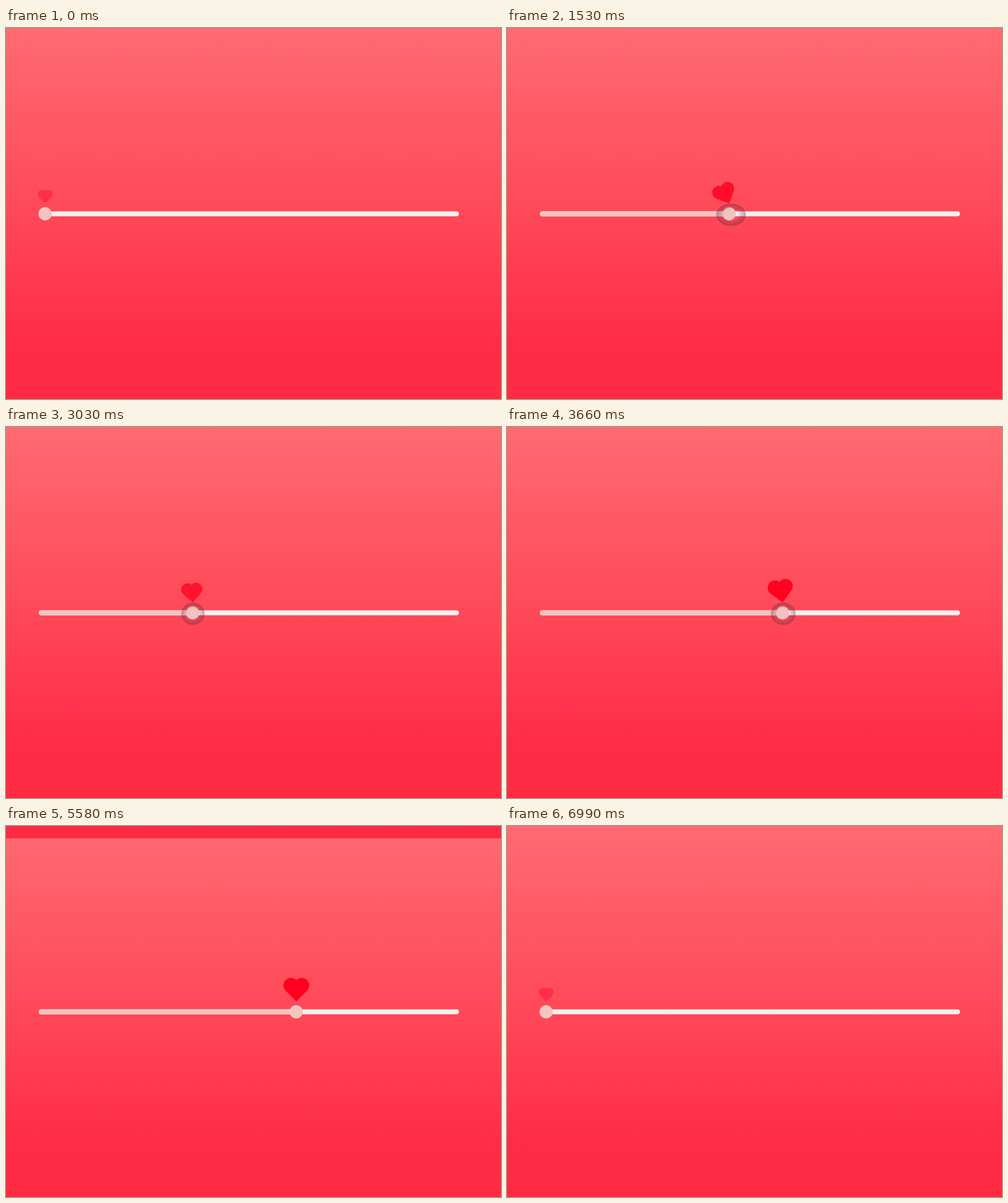
Animation, 800 px wide and 600 px high, one loop 7.95 s. Source, as an HTML page with a canvas:

```html
<!DOCTYPE html>
<html lang="en">
<head>
<meta charset="utf-8">
<title>Love slider</title>
<style>
html, body { margin: 0; width: 100%; height: 100%; overflow: hidden; background: #ff4858; }
canvas { display: block; }
</style>
</head>
<body>
<canvas id="stage" width="800" height="600"></canvas>
<script>
const ctx = document.getElementById('stage').getContext('2d');
const LOOP = 7950;
const LEFT = 53, RIGHT = 732, MID = 300.5, START = 63.25, TIP = 283.7;

// Drag legs: start time, end time, from x, to x, peak heart tilt in degrees
const legs = [
  [885, 1990, 64, 536, -26],
  [1990, 2860, 536, 297, 33.6],
  [2922, 3935, 297, 477, -12],
  [3935, 4060, 477, 469, 5]
];

const clamp = v => Math.min(1, Math.max(0, v));
const span = (t, a, b) => clamp((t - a) / (b - a));
const lerp = (a, b, p) => a + (b - a) * p;
const sine = p => (1 - Math.cos(Math.PI * p)) / 2;
const quad = p => p < 0.5 ? 2 * p * p : 1 - 2 * (1 - p) ** 2;

// Grows from 0 to 1, passing about 1.28 on the way
function pop(p) {
  const k = 3.6, q = p - 1;
  return 1 + (k + 1) * q ** 3 + k * q * q;
}

const sky = ctx.createLinearGradient(0, 0, 0, 600);
[[0, '#ff6b73'], [0.5, '#ff4858'], [0.85, '#ff2c47'], [1, '#ff2942']]
  .forEach(([at, color]) => sky.addColorStop(at, color));

const touch = ctx.createRadialGradient(0, 0, 0, 0, 0, 18);
[[0, 0], [0.5, 0.02], [0.65, 0.18], [0.82, 0.25], [0.92, 0.36], [1, 0.3]]
  .forEach(([at, a]) => touch.addColorStop(at, `rgba(70,40,55,${a})`));

function drag(t) {
  let x = 64, tilt = 0;
  for (const [a, b, from, to, peak] of legs) {
    if (t < a) break;
    const p = span(t, a, b);
    x = lerp(from, to, sine(p));
    tilt = peak * Math.sin(Math.PI * p);
  }
  return { x, tilt };
}

function disc(x, y, r, color) {
  ctx.fillStyle = color;
  ctx.beginPath();
  ctx.arc(x, y, Math.max(0, r), 0, Math.PI * 2);
  ctx.fill();
}

function bar(x1, color) {
  const w = x1 - LEFT;
  if (w <= 0) return;
  ctx.fillStyle = color;
  ctx.beginPath();
  ctx.roundRect(LEFT, MID - 4, w, 8, Math.min(4, w / 2));
  ctx.fill();
}

// A square on its corner with a half circle on each upper side; origin at the tip
function heart(x, y, scale, tilt, color) {
  if (scale <= 0) return;
  const s = 14.06, d = s * Math.SQRT1_2, q = Math.PI / 4;
  ctx.save();
  ctx.translate(x, y);
  ctx.rotate(tilt * Math.PI / 180);
  ctx.scale(scale, scale);
  ctx.fillStyle = color;
  ctx.beginPath();
  ctx.moveTo(0, 0);
  ctx.arc(-d / 2, -1.5 * d, s / 2, 3 * q, 7 * q);
  ctx.arc(d / 2, -1.5 * d, s / 2, 5 * q, 9 * q);
  ctx.closePath();
  ctx.fill();
  ctx.restore();
}

function background(y) {
  ctx.save();
  ctx.translate(0, y);
  ctx.fillStyle = sky;
  ctx.fillRect(0, 0, 800, 600);
  ctx.restore();
}

function echo(t, x, scale) {
  if (t < 4180 || t > 5130) return;
  const p = span(t, 4180, 4440);
  const grow = lerp(1, 2.15, 1 - (1 - p) ** 2);
  ctx.globalAlpha = lerp(0.5, 0.06, p) * (1 - span(t, 4920, 5130));
  heart(x, 264.4 + 19.3 * grow, scale * grow, 0, '#ff0020');
  ctx.globalAlpha = 1;
}

function finger(t, x, lag) {
  if (t < 130 || t > 4170) return;
  const p = sine(span(t, 130, 870));
  ctx.save();
  ctx.globalAlpha = 1 - span(t, 4060, 4170);
  ctx.translate(p < 1 ? lerp(-20, 64, p) : x, lerp(407, 302, p));
  ctx.scale(1 + Math.abs(lag) / 9, 1);
  disc(0, 0, 18, touch);
  ctx.restore();
}

function slider(x, tilt, trackEnd, knobSize, heartSize) {
  const away = x - START;
  const scale = 1 + 0.00182 * away;
  const hue = clamp(away / 405);
  const g = Math.round(lerp(45, 0, hue)), b = Math.round(lerp(72, 32, hue));
  bar(trackEnd, '#f5eff0');
  if (away > 0.5) bar(x, '#f1c5bf');
  disc(x, MID, 10.75 * knobSize, '#f1c6c1');
  heart(x + 0.2, TIP, scale * heartSize, tilt, `rgb(255,${g},${b})`);
  return scale;
}

function draw(t) {
  background(0);
  if (t < 5790) {
    const { x, tilt } = drag(t);
    const lag = -tilt * 0.12;
    const knob = t < 885 ? START : x - lag;
    const scale = slider(knob, tilt, RIGHT, 1, 1);
    echo(t, knob, scale);
    finger(t, x, lag);
    if (t > 5550) background(-600 + 600 * quad(span(t, 5550, 5790)));
  } else if (t >= 6130) {
    const end = lerp(LEFT, RIGHT, span(t, 6425, 6990));
    slider(START, 0, end, pop(span(t, 6130, 6440)), pop(span(t, 6260, 6600)));
  }
}

const began = performance.now();
function tick() {
  draw((performance.now() - began) % LOOP);
  requestAnimationFrame(tick);
}
tick();
</script>
</body>
</html>
```
